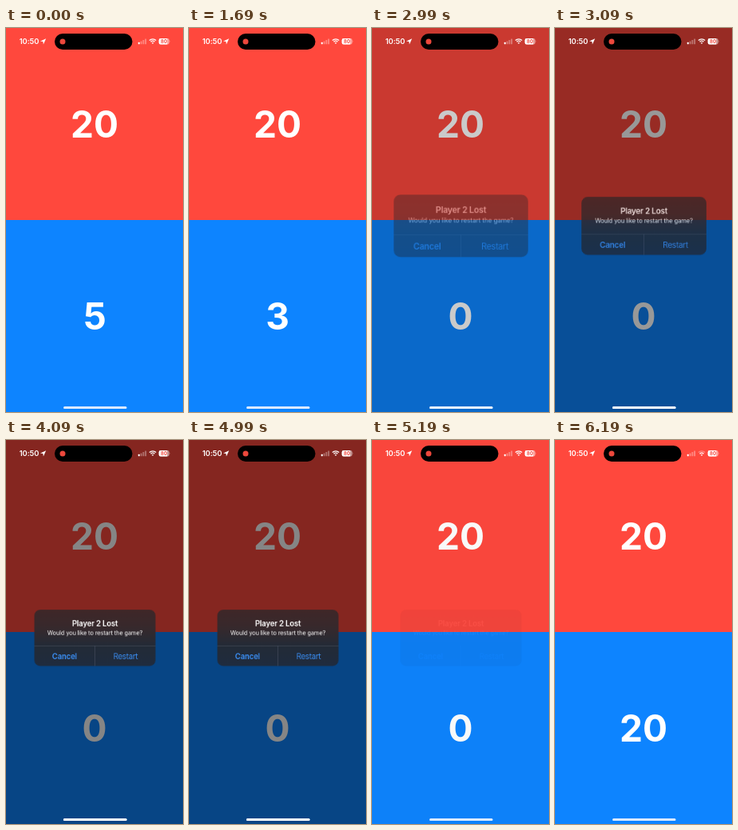
Recreate the animation shown at these times as an HTML page. Size 222 by 480 pixels, loop 6290 ms.

```html
<!DOCTYPE html>
<html lang="en">
<head>
<meta charset="utf-8">
<title>Life counter</title>
<style>
  html, body { margin: 0; width: 100%; height: 100%; overflow: hidden; background: #000; }
  svg { display: block; }
  text { font-family: Inter, "Liberation Sans", sans-serif; fill: #fff; text-anchor: middle; }

  .count { font-size: 46px; font-weight: 700; }
  .title, .button { font-size: 9.6px; letter-spacing: -.2px; }
  .strong { font-weight: 600; }
  .message { font-size: 7.3px; letter-spacing: -.06px; }
  .button { fill: #3b8ef3; }
  .clock { font-size: 9.4px; font-weight: 600; letter-spacing: -.1px; }
  .charge { font-size: 6px; font-weight: 700; fill: #f5483e; }

  .strip, .fade, .alert, .wifi { animation: 6290ms step-end infinite; }
  .strip { animation-name: count; }
  .fade { animation-name: fade; }
  .alert { animation-name: settle; transform-origin: 111.5px 247.3px; }
  .wifi { animation-name: weaken; }

  /* 5 4 3 2 1 0 20, one row of 80px each */
  @keyframes count {
    0% { transform: translateY(0); }
    9.3% { transform: translateY(-80px); }
    18.9% { transform: translateY(-160px); }
    28.4% { transform: translateY(-240px); }
    37.9% { transform: translateY(-320px); }
    47.5% { transform: translateY(-400px); }
    85.6%, 100% { transform: translateY(-480px); }
  }
  @keyframes fade {
    0% { opacity: 0; }
    47.5% { opacity: .43; }
    49.1% { opacity: .84; }
    50.7% { opacity: .96; }
    52.3% { opacity: 1; }
    80.9% { opacity: .4; }
    82.5% { opacity: .05; }
    84.1%, 100% { opacity: 0; }
  }
  @keyframes settle {
    0% { transform: scale(1.19); }
    47.5% { transform: scale(1.108); }
    49.1% { transform: scale(1.03); }
    50.7% { transform: scale(1.008); }
    52.3%, 100% { transform: scale(1); }
  }
  @keyframes weaken {
    0% { opacity: 1; }
    85.6%, 100% { opacity: .35; }
  }
</style>
</head>
<body>
<svg width="222" height="480" viewBox="0 0 222 480">
  <defs>
    <linearGradient id="glass" x1="0" y1="0" x2="0" y2="1">
      <stop offset="0" stop-color="#3f2728"/>
      <stop offset=".3" stop-color="#38292c"/>
      <stop offset=".65" stop-color="#232b37"/>
      <stop offset="1" stop-color="#1f2c3f"/>
    </linearGradient>
  </defs>

  <rect width="222" height="240" fill="#ff483d"/>
  <rect y="240" width="222" height="240" fill="#0d84ff"/>

  <text class="count" x="111" y="137">20</text>
  <svg y="320" width="222" height="80" overflow="hidden">
    <g class="strip count">
      <text x="111.5" y="57">5</text>
      <text x="111" y="137">4</text>
      <text x="111" y="217">3</text>
      <text x="111" y="297">2</text>
      <text x="111" y="377">1</text>
      <text x="111" y="457">0</text>
      <text x="111" y="537">20</text>
    </g>
  </svg>

  <rect class="fade" width="222" height="480" fill="#000" fill-opacity=".48"/>

  <g class="fade">
    <g class="alert">
      <rect x="35.5" y="212" width="152" height="70.5" rx="7.5" fill="url(#glass)"/>
      <path d="M35.5 257.5h152M111.5 257.5v25" stroke="#8c94a4" stroke-opacity=".3" stroke-width=".6"/>
      <text class="title strong" x="111.5" y="233">Player 2 Lost</text>
      <text class="message" x="111.5" y="243.7">Would you like to restart the game?</text>
      <text class="button strong" x="73.3" y="274">Cancel</text>
      <text class="button" x="150" y="274">Restart</text>
    </g>
  </g>

  <!-- Status bar -->
  <text class="clock" x="29" y="20.3">10:50</text>
  <path d="M50.2 13.2L46.9 20.4L46.4 17L43 16.5Z" fill="#fff"/>
  <rect x="61" y="7" width="97.5" height="20" rx="10"/>
  <circle cx="71" cy="17" r="3.5" fill="#ec483c"/>
  <g fill="#fff">
    <rect x="165.8" y="17.8" width="1.9" height="2.4" rx=".5"/>
    <g opacity=".35">
      <rect x="168.6" y="16.5" width="1.9" height="3.7" rx=".5"/>
      <rect x="171.4" y="15" width="1.9" height="5.2" rx=".5"/>
      <rect x="174.2" y="13.5" width="1.9" height="6.7" rx=".5"/>
    </g>
    <path d="M182.7 18.5a1.9 1.9 0 0 1 2.6 0L184 20Z"/>
  </g>
  <g fill="none" stroke="#fff" stroke-width="1.2">
    <path d="M181.5 17.2a3.7 3.7 0 0 1 5 0"/>
    <path class="wifi" d="M179.8 15.5a6.1 6.1 0 0 1 8.4 0"/>
  </g>
  <rect x="191.7" y="13" width="13" height="7.4" rx="2.2" fill="#fff" fill-opacity=".5"/>
  <path d="M193.9 13h8.3v7.4h-8.3a2.2 2.2 0 0 1-2.2-2.2v-3a2.2 2.2 0 0 1 2.2-2.2Z" fill="#fff"/>
  <path d="M205.3 15.5q1 1.2 0 2.4Z" fill="#fff" fill-opacity=".6"/>
  <text class="charge" x="198.1" y="18.9">80</text>

  <rect x="72" y="473" width="79.5" height="3" rx="1.5" fill="#d9eaff"/>
  <rect class="fade" x="72" y="473" width="79.5" height="3" rx="1.5" fill="#fff"/>
</svg>
</body>
</html>
```
